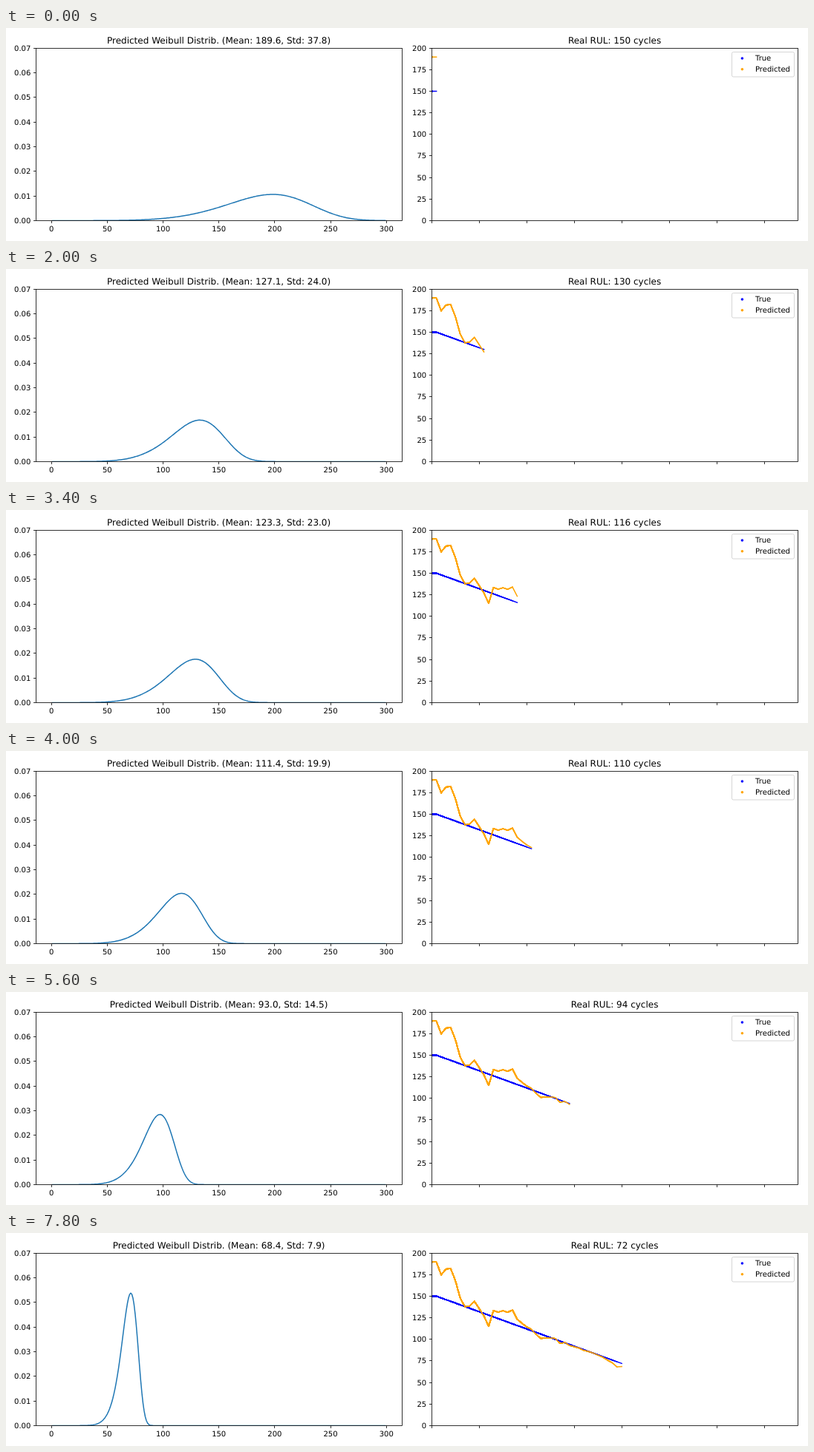
Write an HTML page that moves like this. It is 1080 px wide and 288 px high and loops after 8 s.

```html
<!DOCTYPE html>
<html lang="en">
<head>
<meta charset="utf-8">
<title>Remaining life forecast</title>
<style>
  html, body { margin: 0; width: 100%; height: 100%; overflow: hidden; background: #fff; }
  svg { display: block; width: 1080px; height: 288px; }
  text { font: 10px "DejaVu Sans", sans-serif; fill: #000; text-rendering: geometricPrecision; }
  .title { font-size: 12px; text-anchor: middle; }
  .axis { fill: none; stroke: #000; stroke-width: .8; }
  .line { fill: none; stroke-width: 1.5; stroke-linecap: square; stroke-linejoin: round; }
</style>
</head>
<body>
<svg id="stage" viewBox="0 0 1080 288" xmlns="http://www.w3.org/2000/svg">
  <defs>
    <clipPath id="clipL"><rect x="40" y="27" width="493.5" height="233.5"/></clipPath>
    <clipPath id="clipR"><rect x="573" y="27" width="493.5" height="233.5"/></clipPath>
  </defs>
  <rect width="1080" height="288" fill="#fff"/>
</svg>
<script>
const svg = document.getElementById('stage');
const STEP = 200, COUNT = 40;
const TOP = 27.1, BASE = 260.4, LEFT = 40.3, RIGHT = 573.2, WIDTH = 492.8;
const BLUE = '#0000ff', ORANGE = '#ffa500';

// Predicted mean at each step, and how the spread depends on it.
const means = [
  189.6, 174.7, 181.4, 182, 168, 148, 137.6, 138.6, 144, 135.6,
  127.1, 115, 133.4, 131.4, 133.1, 131.3, 134, 123.3, 118.6, 114.5,
  111.4, 105.6, 101, 101.4, 101.6, 100.8, 95.4, 96.4, 93, 91.5,
  89.9, 87.3, 85.9, 84, 81.7, 79.4, 75.8, 72.8, 68, 68.4
];
const spread = [[60, 6.3], [68.4, 7.9], [79.4, 10.1], [93, 14.5], [101.6, 17.4],
  [123.3, 23], [127.1, 24], [189.6, 37.8]];

function add(tag, attrs, parent = svg) {
  const el = document.createElementNS('http://www.w3.org/2000/svg', tag);
  for (const name in attrs) el.setAttribute(name, attrs[name]);
  parent.appendChild(el);
  return el;
}

function label(x, y, str, anchor, cls = '') {
  const el = add('text', { x, y, class: cls });
  if (anchor) el.setAttribute('text-anchor', anchor);
  el.textContent = str;
  return el;
}

const yAt = f => BASE - f * (BASE - TOP);
const lifeX = i => RIGHT + i * 6.4;
const lifeY = v => yAt(v / 200);
const densX = v => LEFT + (v + 13.9) * WIDTH / 327.8;
const snap = v => Math.floor(v) + .5;
const toPath = pts => 'M' + pts.map(p => p[0].toFixed(2) + ' ' + p[1].toFixed(2)).join('L');

function stdFor(mean) {
  let i = 1;
  while (i < spread.length - 1 && mean > spread[i][0]) i++;
  const [m0, s0] = spread[i - 1], [m1, s1] = spread[i];
  return s0 + (s1 - s0) * (mean - m0) / (m1 - m0);
}

function gamma(x) {
  let div = 1;
  while (x < 9) div *= x++;
  return Math.sqrt(2 * Math.PI / x) * Math.pow(x / Math.E, x) *
    Math.exp(1 / (12 * x) - 1 / (360 * x ** 3)) / div;
}

function weibull(mean, std) {
  const target = 1 + (std / mean) ** 2;
  let lo = 1, hi = 40;
  for (let i = 0; i < 40; i++) {
    const k = (lo + hi) / 2;
    if (gamma(1 + 2 / k) / gamma(1 + 1 / k) ** 2 > target) lo = k; else hi = k;
  }
  const scale = mean / gamma(1 + 1 / lo);
  return x => lo / scale * (x / scale) ** (lo - 1) * Math.exp(-((x / scale) ** lo));
}

function densityPath(mean) {
  const pdf = weibull(mean, stdFor(mean));
  const pts = [];
  for (let x = 1; x < 300; x++) pts.push([densX(x), yAt(pdf(x) / .07)]);
  return toPath(pts);
}

function frame(x) {
  add('rect', { x: snap(x), y: 27.5, width: 493, height: 233, class: 'axis' });
}

function xTick(x, str) {
  add('path', { d: `M${snap(x)} 260.5v3.5`, class: 'axis' });
  if (str) label(x, 275, str, 'middle');
}

function yTick(x, f, str) {
  const y = yAt(f);
  add('path', { d: `M${snap(x)} ${snap(y)}h-3.5`, class: 'axis' });
  label(x - 7, Math.round(y + 3.5), str, 'end');
}

// Plotted data
const curve = add('path', { class: 'line', stroke: '#1f77b4', 'clip-path': 'url(#clipL)' });
const plot = add('g', { 'clip-path': 'url(#clipR)' });
const dot = (x, y, fill, parent) => add('circle', { cx: x, cy: y, r: 1.8, fill }, parent);
dot(RIGHT, lifeY(150), BLUE, plot);
dot(RIGHT, lifeY(means[0]), ORANGE, plot);

// Every step draws the whole history again, so older parts look heavier.
const lifeLeft = k => 150 - 2 * k;
const truth = [[lifeX(0), lifeY(150)]];
const guess = [[lifeX(0), lifeY(means[0])]];
const layers = means.map((mean, k) => {
  truth.push([lifeX(k + 1), lifeY(lifeLeft(k))]);
  guess.push([lifeX(k + 1), lifeY(mean)]);
  const g = add('g', {}, plot);
  add('path', { d: toPath(truth), class: 'line', stroke: BLUE }, g);
  add('path', { d: toPath(guess), class: 'line', stroke: ORANGE }, g);
  return g;
});
const curves = means.map(densityPath);

// Axes
frame(LEFT);
frame(RIGHT);
for (let v = 0; v <= 300; v += 50) xTick(densX(v), String(v));
for (let i = 0; i < 8; i++) {
  yTick(LEFT, i / 7, (i / 100).toFixed(2));
  xTick(lifeX(i * 10));
}
for (let v = 0; v <= 200; v += 25) yTick(RIGHT, v / 200, String(v));

// Legend
add('rect', { x: 977.5, y: 32.5, width: 84, height: 33.5, rx: 2,
  fill: '#fff', 'fill-opacity': .8, stroke: '#ccc', 'stroke-opacity': .8 });
[['True', BLUE], ['Predicted', ORANGE]].forEach(([name, color], i) => {
  dot(991.4, 41 + i * 14.7, color);
  label(1009, 44 + i * 15, name);
});

const leftTitle = label(286.6, 21, '', '', 'title');
const rightTitle = label(819.6, 21, '', '', 'title');

let shown = -1;
function draw(time) {
  const k = Math.floor(time / STEP) % COUNT;
  if (k === shown) return;
  shown = k;
  const mean = means[k];
  curve.setAttribute('d', curves[k]);
  layers.forEach((g, i) => g.setAttribute('display', i <= k ? 'inline' : 'none'));
  leftTitle.textContent =
    `Predicted Weibull Distrib. (Mean: ${mean.toFixed(1)}, Std: ${stdFor(mean).toFixed(1)})`;
  rightTitle.textContent = `Real RUL: ${lifeLeft(k)} cycles`;
}

const start = performance.now();
function tick() {
  draw(Math.max(0, performance.now() - start));
  requestAnimationFrame(tick);
}
tick();
</script>
</body>
</html>
```
